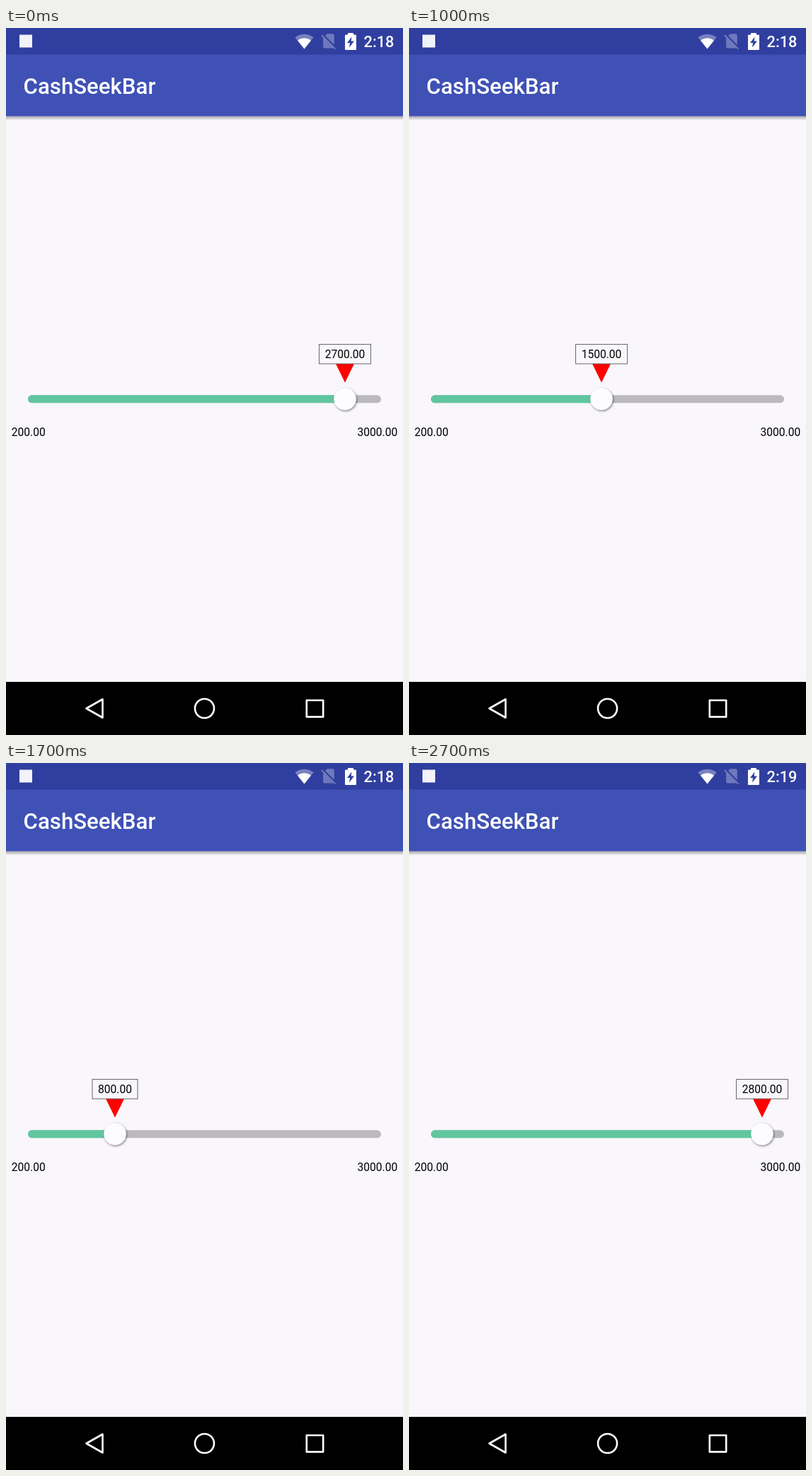
Write an HTML page that moves like this. It is 561 by 998 pixels and loops after 2.8 s.

```html
<!DOCTYPE html>
<html lang="en">
<head>
<meta charset="utf-8">
<title>CashSeekBar</title>
<style>
  html, body { margin: 0; height: 100%; overflow: hidden; }
  svg { display: block; width: 561px; height: 998px; background: #f9f7fb; }
  text { font: 15.58px Roboto, sans-serif; }
  .title { font-size: 31.2px; font-weight: 500; fill: #fff; }
  .clock { font-size: 21.8px; font-weight: 500; fill: #fff; }
  .nav { fill: none; stroke: #fff; stroke-width: 2.6; stroke-linejoin: round; }
  .track { stroke-width: 11; stroke-linecap: round; }
</style>
</head>
<body>
<svg viewBox="0 0 561 998">
  <defs>
    <linearGradient id="shade" x2="0" y2="1">
      <stop stop-color="#000" stop-opacity=".33"/>
      <stop offset="1" stop-color="#000" stop-opacity="0"/>
    </linearGradient>
    <filter id="soft" x="-50%" y="-50%" width="200%" height="200%">
      <feGaussianBlur stdDeviation="1.7"/>
    </filter>
  </defs>

  <!-- App bar and status bar -->
  <rect y="124.5" width="561" height="6" fill="url(#shade)"/>
  <rect width="561" height="124.6" fill="#3f51b5"/>
  <rect width="561" height="37.5" fill="#303f9f"/>
  <text class="title" x="24.6" y="93">CashSeekBar</text>
  <rect x="19" y="9.5" width="18" height="18" fill="#f1f2fa"/>
  <g fill="#fff" transform="translate(408 6.6) scale(1.04)">
    <path opacity=".35" d="M13 22L25.6 6.5C25.1 6.1 20.3 2.1 13 2.1S.9 6.1.4 6.5z"/>
    <path d="M13 22l9.2-11.4c-.4-.4-4-3.3-9.2-3.3s-8.7 2.9-9.2 3.3z"/>
  </g>
  <path fill="#fff" opacity=".3" transform="translate(442.5 5) scale(1.12)"
    d="M19 5a2 2 0 0 0-2-2h-7L7.7 5.3 19 16.7zM3.7 3.9L2.4 5.2 5 7.8V19a2 2 0 0 0 2 2h10l1-.3 1.9 1.9 1.2-1.2z"/>
  <path fill="#fff" d="M483 7h8v2.6h3q1 0 1 1v19.4q0 1-1 1h-14q-1 0-1-1V10.600q0-1 1-1h3z"/>
  <path fill="#303f9f" d="M488.500 12.500L482 21h4l-1 6.500 7-9h-4.300z"/>
  <text class="clock" id="clock" x="548.5" y="27.3" text-anchor="end"></text>

  <!-- Seek bar -->
  <path class="track" stroke="#bcb9bd" d="M36.500 523.800H524.500"/>
  <path class="track" stroke="#60c69f" id="fill"/>
  <text x="7.8" y="576">200.00</text>
  <text x="553.2" y="576" text-anchor="end">3000.00</text>
  <g id="thumb">
    <circle cx="1" cy="525" r="16" opacity=".42" filter="url(#soft)"/>
    <circle cy="523.7" r="15.8" fill="#fdfcfe"/>
    <path fill="#f00" d="M-13 474H13L0 500.500z"/>
    <rect id="box" y="446.500" height="27.500" fill="#f9f7fb" stroke="#68676a"/>
    <text id="value" y="466" text-anchor="middle"></text>
  </g>

  <!-- Navigation bar -->
  <rect y="923" width="561" height="75"/>
  <path class="nav" d="M113.500 960.500L136.500 947.500V973.500z"/>
  <circle class="nav" cx="280.500" cy="960.500" r="13.500"/>
  <rect class="nav" x="424.800" y="949" width="23.400" height="23.400"/>
</svg>
<script>
  const el = id => document.getElementById(id);
  const LOOP = 2800, STEP = 100;

  // Drag path: step, x, velocity in px per step
  const drag = [
    [5, 479, 0], [8, 354, -45], [13, 164, -36], [17, 154, 72],
    [19, 327, 78], [22, 491, 18], [23, 499, 0]
  ];

  function thumbX(step) {
    if (step <= 5) return 479;
    if (step >= 23) return 499;
    const i = drag.findIndex(key => key[0] > step);
    const [t0, x0, v0] = drag[i - 1], [t1, x1, v1] = drag[i];
    const span = t1 - t0, u = (step - t0) / span, w = 1 - u;
    return w * w * (1 + 2 * u) * x0 + u * u * (3 - 2 * u) * x1
      + u * w * span * (w * v0 - u * v1);
  }

  function draw() {
    const step = Math.floor(performance.now() % LOOP / STEP);
    const x = Math.round(thumbX(step));
    const amount = 200 + Math.floor((x - 46) / 471 * 28) * 100;
    const width = amount < 1000 ? 64 : 73;
    el('thumb').setAttribute('transform', `translate(${x})`);
    el('fill').setAttribute('d', `M36.5 523.8H${x}`);
    el('box').setAttribute('x', -width / 2);
    el('box').setAttribute('width', width);
    el('value').textContent = amount.toFixed(2);
    el('clock').textContent = step < 27 ? '2:18' : '2:19';
    requestAnimationFrame(draw);
  }
  draw();
</script>
</body>
</html>
```
